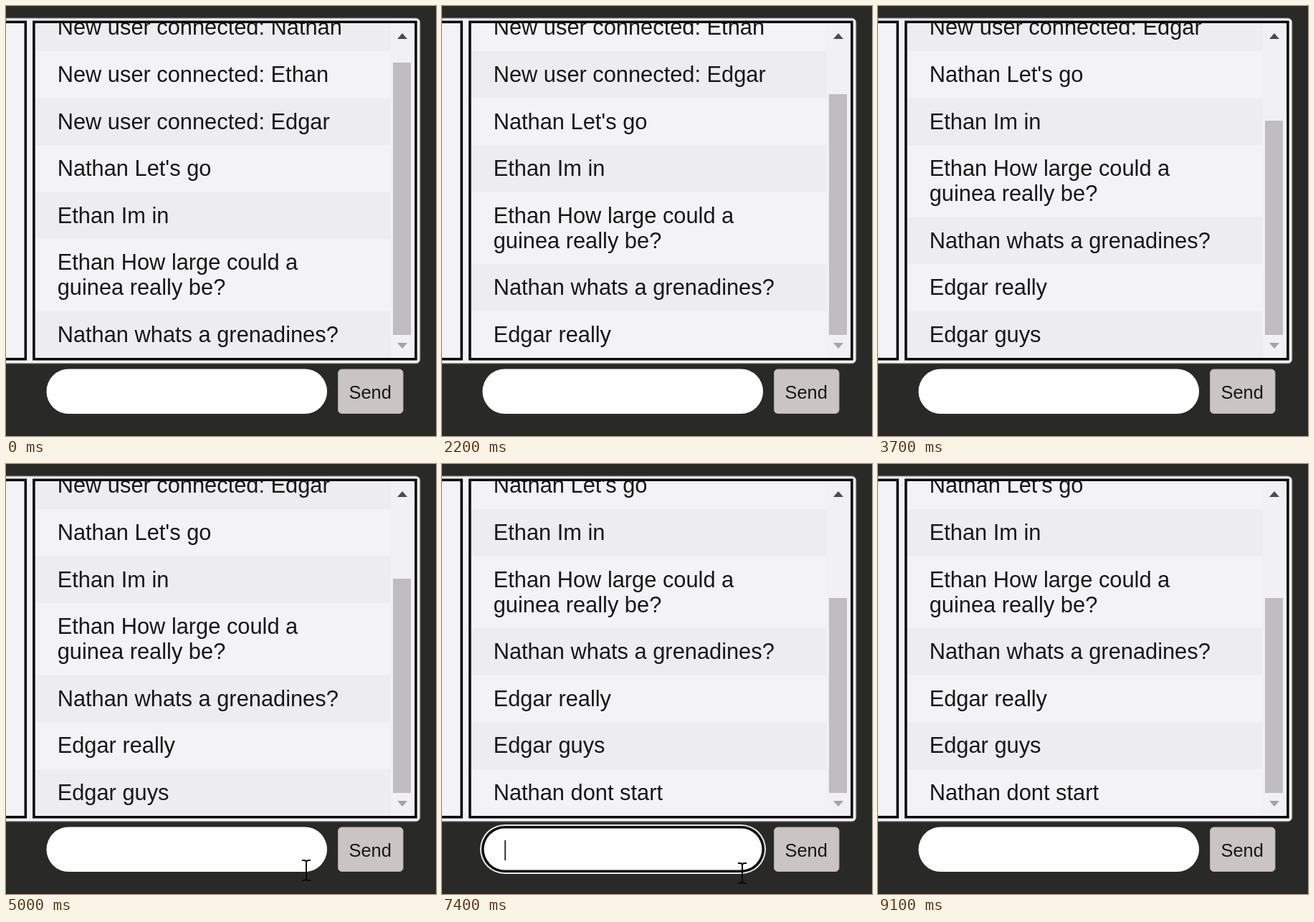
Animation of 600 by 600 pixels, one loop 9200 ms. Source, as an HTML page:

```html
<!DOCTYPE html>
<html lang="en">
<head>
<meta charset="utf-8">
<title>Chat</title>
<style>
  html, body { margin: 0; width: 100%; height: 100%; overflow: hidden; background: #292928; }
  svg { display: block; width: 100vw; height: 100vh; }
  text { font-family: "Liberation Sans", Arial, sans-serif; fill: #171717; white-space: pre; }
  .message { font-size: 30.8px; }
  .control { font-size: 25.4px; }
</style>
</head>
<body>
<svg viewBox="0 0 600 600">
  <defs>
    <clipPath id="view"><rect x="41" y="24" width="530" height="467"/></clipPath>
  </defs>
  <rect width="600" height="600" fill="#292928"/>

  <rect x="-20" y="17" width="597.8" height="481.8" rx="6" fill="#f3f2f4" stroke="#8b8a8b"/>
  <g fill="#f3f2f4" stroke="#0d0a0d" stroke-width="3.6">
    <rect x="-20" y="22.3" width="47.3" height="470.4"/>
    <rect x="38.9" y="22.3" width="533" height="470.4"/>
  </g>

  <g clip-path="url(#view)"><g id="messages"></g></g>

  <rect x="537" y="24" width="31" height="467" fill="#f1f0f2"/>
  <rect id="thumb" x="540" width="25" fill="#bfbdbf"/>
  <path d="M546 46 L553 38 L560 46 Z" fill="#4c4b4c"/>
  <path d="M546 470 L560 470 L553 478 Z" fill="#a5a4a5"/>

  <rect x="56.5" y="506.5" width="391.5" height="62.5" rx="31" fill="#fff"/>
  <g id="focus">
    <rect x="53" y="503" width="399" height="69" rx="34.5" fill="#e9e9e9"/>
    <rect x="55" y="505" width="395" height="65" rx="32.5" fill="#101010"/>
    <rect x="58.6" y="508.6" width="387.8" height="57.8" rx="28.9" fill="#fff"/>
  </g>
  <text id="draft" class="control" x="87.5" y="547.5"></text>
  <rect id="caret" y="525" width="2" height="28" fill="#333"/>

  <rect x="463.5" y="507" width="90.5" height="61.5" rx="5" fill="#cbc4c4" stroke="#b3adad"/>
  <text class="control" x="478.5" y="547.5">Send</text>

  <path id="pointer" d="M-6 -14 H-3 Q0 -14 0 -11 V11 Q0 14 -3 14 H-6 M6 -14 H3 Q0 -14 0 -11 M0 11 Q0 14 3 14 H6"
        fill="none" stroke="#0a0a0a" stroke-width="2"/>
</svg>
<script>
const LOOP = 9200, STEP = 100;
const ROW = 65.6, LINE = 35, BOTTOM = 491.6, THUMB_END = 459;
const [A, B, C] = ["Nathan", "Ethan", "Edgar"];

const messages = [
  ["New user connected: " + A],
  ["New user connected: " + B],
  ["New user connected: " + C],
  [A + " Let's go"],
  [B + " Im in"],
  [B + " How large could a", "guinea really be?"],
  [A + " whats a grenadines?"],
  [C + " really"],
  [C + " guys"],
  [A + " dont start"]
];

// Each state: start time, number of messages, top of the scrollbar thumb
const states = [[0, 7, 79], [1300, 8, 123], [3600, 9, 160], [7400, 10, 187]];

const FOCUS = 5100, SENT = 7400, BLUR = 8700;
const draftText = "dont start";
const keyTimes = [5700, 5900, 6000, 6200, 6600, 6700, 6800, 6900, 7000, 7200];

// Pointer keys: time, x, y
const pointerPath = [[4600, 428, 606], [4800, 421, 576], [4900, 419, 567], [5200, 419, 567], [5400, 419, 571], [BLUR, 419, 571]];

const $ = id => document.getElementById(id);

function add(parent, tag, attrs, content = "") {
  const node = document.createElementNS("http://www.w3.org/2000/svg", tag);
  for (const key in attrs) node.setAttribute(key, attrs[key]);
  node.textContent = content;
  return parent.appendChild(node);
}

const show = (node, on) => node.setAttribute("visibility", on ? "visible" : "hidden");

const rowEnds = [];
let rowY = 0;
messages.forEach((lines, i) => {
  const height = ROW + (lines.length - 1) * LINE;
  add($("messages"), "rect", { x: 41, y: rowY, width: 496, height, fill: i % 2 ? "#f3f2f4" : "#edecee" });
  lines.forEach((line, k) =>
    add($("messages"), "text", { class: "message", x: 71.7, y: rowY + 43 + k * LINE }, line));
  rowEnds.push(rowY += height);
});

function pointerAt(t) {
  const i = pointerPath.findIndex(([time]) => time > t);
  const [t0, x0, y0] = pointerPath[i - 1], [t1, x1, y1] = pointerPath[i];
  const k = (t - t0) / (t1 - t0);
  return [x0 + (x1 - x0) * k, y0 + (y1 - y0) * k];
}

function render(t) {
  const [, count, thumbTop] = states.filter(([start]) => start <= t).pop();
  $("messages").setAttribute("transform", `translate(0 ${BOTTOM - rowEnds[count - 1]})`);
  $("thumb").setAttribute("y", thumbTop);
  $("thumb").setAttribute("height", THUMB_END - thumbTop);

  const focused = t >= FOCUS && t < BLUR;
  const typed = t < SENT ? keyTimes.filter(time => time <= t).length : 0;
  $("draft").textContent = draftText.slice(0, typed);
  show($("focus"), focused);

  // The caret's blink restarts after every edit
  const lastEdit = [FOCUS, ...keyTimes, SENT].filter(time => time <= t).pop();
  show($("caret"), focused && (t - lastEdit) % 1000 < 500);
  $("caret").setAttribute("x", 87.2 + (typed ? $("draft").getComputedTextLength() : 0));

  const pointing = t >= pointerPath[0][0] && t < BLUR;
  show($("pointer"), pointing);
  if (pointing) $("pointer").setAttribute("transform", `translate(${pointerAt(t)})`);
}

const started = performance.now();
function tick() {
  const t = Math.max(0, performance.now() - started) % LOOP;
  render(Math.floor(t / STEP) * STEP);
  requestAnimationFrame(tick);
}
tick();
</script>
</body>
</html>
```
